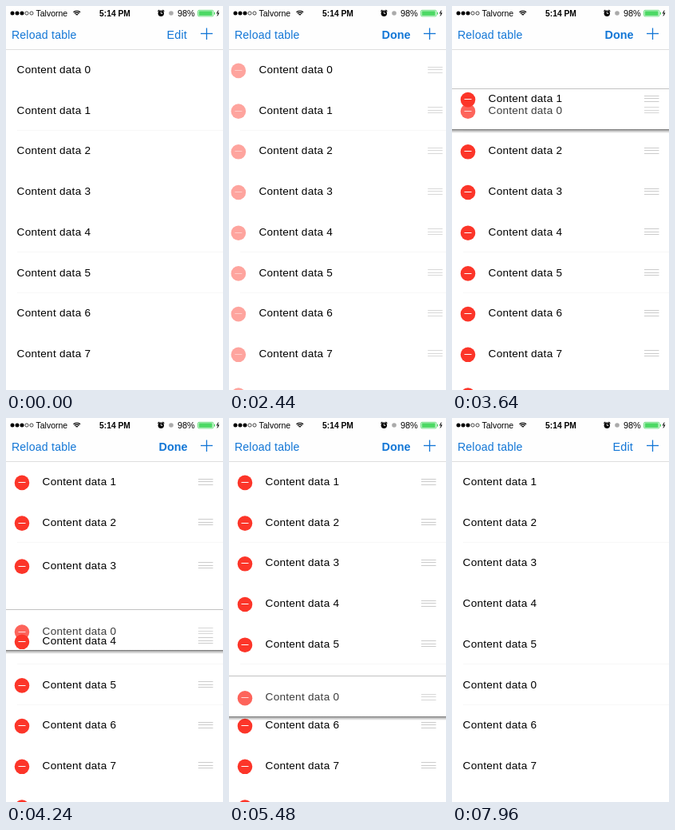
An HTML page with a canvas for the animation above (8 s loop, 272 by 480 pixels).

```html
<!DOCTYPE html>
<html lang="en">
<head>
<meta charset="utf-8">
<style>
html, body { margin: 0; width: 100%; height: 100%; overflow: hidden; background: #fff; }
canvas { display: block; }
</style>
</head>
<body>
<canvas id="stage" width="272" height="480"></canvas>
<script>
const ctx = document.getElementById('stage').getContext('2d');
const LOOP = 8000, ROW = 50.7, FIRST = 79.5;
const BLUE = '#1276d6', RED = '#fc3529', GREEN = '#4cd964';
const FONT = '"Liberation Sans", Arial, sans-serif';

// Finger path: time, vertical offset of the dragged row
const DRAG = [[2960, 0], [3300, 8], [3535, 25.4], [3640, 50.5], [3940, 122],
              [4240, 186.5], [4500, 228], [4900, 257], [5480, 269.3], [5560, 269.3]];
// Moments at which rows 1 to 5 begin to give way
const SWAPS = [3535, 3760, 3988, 4190, 4500];
const LIFT = 2920, DROP = 5560;

const clamp = v => Math.max(0, Math.min(1, v));
const ramp = (t, start, length) => clamp((t - start) / length);
const ease = v => v * v * (3 - 2 * v);
const move = (t, start) => ease(ramp(t, start, 300));

function dragOffset(t) {
  if (t <= DRAG[0][0]) return 0;
  const last = DRAG.length - 1, end = DRAG[last][1];
  if (t >= DROP) return end + (5 * ROW - end) * move(t, DROP);
  const slope = i => {
    if (i === 0 || i === last) return 0;
    const [a, b] = [DRAG[i - 1], DRAG[i + 1]];
    return (b[1] - a[1]) / (b[0] - a[0]);
  };
  const i = DRAG.findIndex(p => p[0] > t) - 1;
  const [t0, y0] = DRAG[i], [t1, y1] = DRAG[i + 1];
  const h = t1 - t0, u = (t - t0) / h, v = 1 - u;
  return y0 * v * v * (1 + 2 * u) + y1 * u * u * (3 - 2 * u)
       + h * u * v * (v * slope(i) - u * slope(i + 1));
}

function rect(x, y, w, h, color) {
  ctx.fillStyle = color;
  ctx.fillRect(x, y, w, h);
}

function disc(x, y, r, color, hollow) {
  ctx.beginPath();
  ctx.arc(x, y, r, 0, 7);
  ctx.fillStyle = ctx.strokeStyle = color;
  ctx.lineWidth = 0.7;
  hollow ? ctx.stroke() : ctx.fill();
}

function line(points, color, width) {
  ctx.beginPath();
  points.forEach(([x, y]) => ctx.lineTo(x, y));
  ctx.strokeStyle = color;
  ctx.lineWidth = width;
  ctx.stroke();
}

function text(str, x, y, size, color = '#000', weight = '', spacing = 0) {
  ctx.font = `${weight} ${size}px ${FONT}`;
  ctx.letterSpacing = spacing + 'px';
  ctx.fillStyle = color;
  ctx.fillText(str, x, y);
}

function faded(alpha, draw) {
  ctx.save();
  ctx.globalAlpha *= alpha;
  draw();
  ctx.restore();
}

function drawRow(index, y, edit) {
  text('Content data ' + index, 13.6 + 32 * edit.shift, y + 4.5, 13.6, '#000', '', 0.25);
  faded(edit.minus, () => {
    disc(edit.minusX, y + 1.4, 9.3, RED);
    rect(edit.minusX - 4.5, Math.round(y + 0.5), 9, 1, '#fff');
  });
  faded(edit.grip, () => {
    for (const dy of [-4, -0.5, 3])
      rect(273 - 32 * edit.shift, Math.round(y + dy), 18.5, 1, '#cbcbcb');
  });
}

function drawFloatingRow(y, lift, edit) {
  faded(lift, () => {
    const top = Math.round(y - 27), bottom = top + 51;
    rect(0, top, 272, 1, '#c2c2c2');
    const shade = ctx.createLinearGradient(0, bottom, 0, bottom + 5);
    shade.addColorStop(0, 'rgba(0,0,0,.6)');
    shade.addColorStop(0.3, 'rgba(0,0,0,.3)');
    shade.addColorStop(1, 'rgba(0,0,0,0)');
    rect(0, bottom, 272, 5, shade);
  });
  faded(1 - 0.23 * lift, () => drawRow(0, y, edit));
}

function drawStatusBar() {
  for (let i = 0; i < 5; i++) disc(8 + 6 * i, 9, i < 3 ? 2.5 : 2.1, '#000', i > 2);
  text('Talvorne', 37.5, 12.8, 10.5);
  for (const r of [2, 4.2, 6.4]) {
    ctx.beginPath();
    ctx.arc(88.8, 12.5, r, -2.3, -0.84);
    ctx.strokeStyle = '#000';
    ctx.lineWidth = 1.4;
    ctx.stroke();
  }
  text('5:14 PM', 117, 12.8, 10.3, '#000', 'bold');

  disc(194.3, 9.2, 3.7, '#000');
  line([[190.3, 6.6], [192.3, 5]], '#000', 1.2);
  line([[196.3, 5], [198.3, 6.6]], '#000', 1.2);
  line([[194.3, 6.8], [194.3, 9.5], [196.3, 9.5]], '#fff', 0.8);
  disc(207, 9, 2.8, '#aaa');

  text('98%', 215, 12.8, 10.9);
  ctx.beginPath();
  ctx.roundRect(240.5, 5.3, 19.5, 7.6, 1.5);
  ctx.strokeStyle = GREEN;
  ctx.lineWidth = 0.8;
  ctx.stroke();
  rect(241.6, 6.3, 17, 5.6, GREEN);
  rect(260.8, 7.8, 1.2, 2.8, GREEN);
  line([[266.2, 5.6], [264.3, 9.2], [266.9, 8.8], [264.8, 12.4]], '#000', 1);
}

function drawNavBar(t) {
  rect(0, 0, 272, 54, '#fefefe');
  rect(0, 54, 272, 1, '#dedede');
  drawStatusBar();
  text('Reload table', 6.9, 41, 14.1, BLUE, '', 0.22);
  line([[244, 34.5], [259, 34.5]], BLUE, 1.3);
  line([[251.5, 27.5], [251.5, 42]], BLUE, 1.3);

  const editing = t >= 2240 && t < 7040;
  const pressed = (t >= 2160 && t < 2240) || (t >= 6840 && t < 7040);
  const alpha = pressed ? 0.18
    : editing ? 0.2 + 0.8 * ramp(t, 2240, 160)
    : t > 7040 ? 0.2 + 0.8 * ramp(t, 7040, 200) : 1;
  faded(alpha, () => editing
    ? text('Done', 191.6, 41, 14.4, BLUE, 'bold')
    : text('Edit', 201.6, 41, 14.4, BLUE, '', 0.1));
}

function editState(t) {
  if (t < 7040) {
    const p = move(t, 2240);
    return { shift: p, minusX: -12 + 32 * p, minus: p ** 2.7, grip: p };
  }
  const p = move(t, 7040);
  return { shift: 1 - p, minusX: 20, minus: clamp(1 - 1.3 * p), grip: 1 - p };
}

function draw(t) {
  const edit = editState(t);
  const lift = ramp(t, LIFT, 200) * (1 - ramp(t, DROP + 100, 250));
  const floatY = FIRST + dragOffset(t);

  rect(0, 0, 272, 480, '#fff');
  for (const slot of [2, 5, 6]) rect(14, Math.floor(54 + slot * ROW), 258, 1, '#f7f7f7');
  faded(lift, () => rect(0, floatY - 27, 272, 52, '#fff'));

  for (let i = 1; i < 9; i++) {
    const raised = i <= SWAPS.length ? move(t, SWAPS[i - 1]) : 0;
    drawRow(i, FIRST + ROW * (i - raised), edit);
  }
  drawFloatingRow(floatY, lift, edit);
  drawNavBar(t);
}

function tick() {
  draw(performance.now() % LOOP);
  requestAnimationFrame(tick);
}
tick();
</script>
</body>
</html>
```
